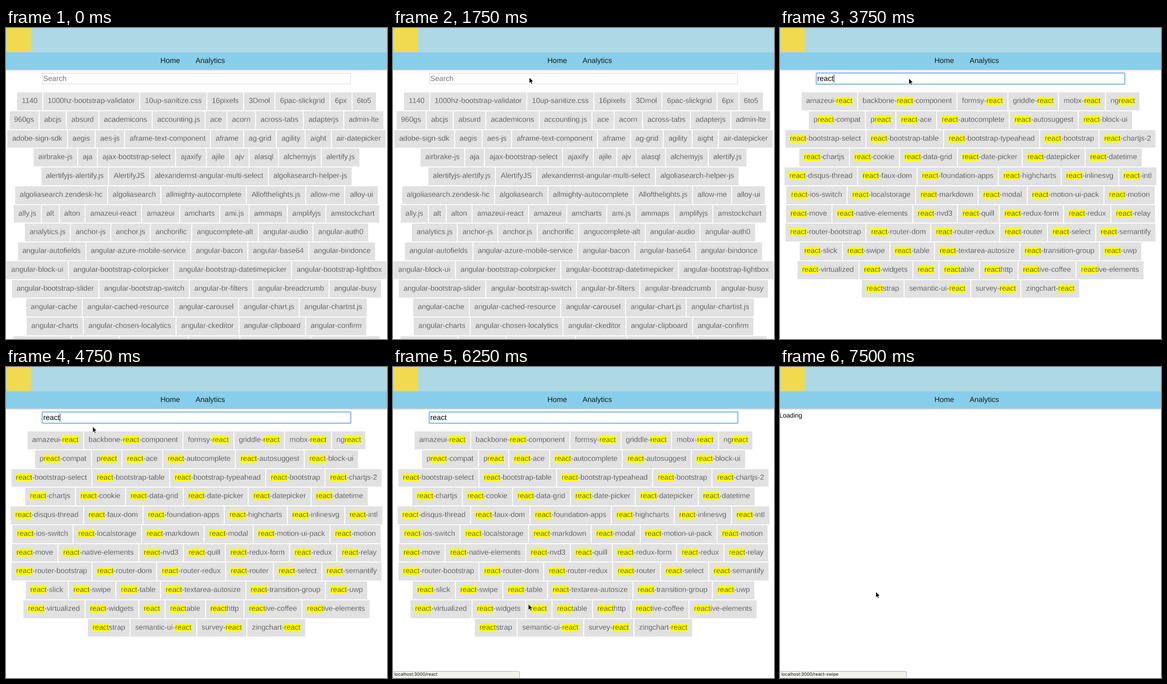
These frames come from a looping animation (829 by 676 pixels, 8000 ms). An HTML page:

```html
<!DOCTYPE html>
<html lang="en">
<head>
<meta charset="utf-8">
<title>Library search</title>
<style>
  html, body { margin: 0; width: 100%; height: 100%; overflow: hidden; background: #fff; }
  body {
    position: relative; font: 16px "Liberation Sans", Arial, sans-serif;
    text-rendering: geometricPrecision; cursor: default;
  }
  #stage { position: absolute; left: 0; top: 0; width: 829px; height: 676px; overflow: hidden; }
  #stage > * { position: absolute; box-sizing: border-box; white-space: nowrap; }
  #banner { left: 0; top: 0; width: 829px; height: 55px; background: #add8e6; }
  #logo { left: 2px; top: 0; width: 53px; height: 52px; background: #f0db4f; }
  #nav {
    left: 0; top: 54px; width: 829px; height: 36px; background: #87ceeb; color: #1a1a1a;
    box-shadow: 0 1px 3px rgba(0, 0, 0, .35); line-height: 36px;
  }
  #nav span { position: absolute; }
  #search {
    left: 79px; top: 98px; width: 671px; height: 24px; padding-left: 1px;
    border: 1px solid #d3d3d3; line-height: 23px; color: #757575; background: #fff;
  }
  #search.typed { color: #000; }
  #search.focused::after {
    content: ""; position: absolute; inset: -2px; border: 2px solid #7fb6f6;
    border-radius: 2px; box-shadow: 0 0 1px 1px rgba(127, 182, 246, .4);
  }
  #caret { top: 101px; width: 1px; height: 18px; background: #000; }
  .row {
    position: absolute; left: 0; width: 829px; height: 38.75px; line-height: 38.75px;
    display: flex; justify-content: center; gap: 2px;
    font-size: 15.96px; color: #484848;
  }
  .tag { flex: none; padding: 0 10px; background: #e1e1e1; -webkit-text-stroke: .28px #e1e1e1; }
  .blank { padding: 0; }
  mark { color: inherit; background: #ff0; -webkit-text-stroke-color: #ff0; }
  #loading { left: -1.5px; top: 97px; font-size: 14px; line-height: 17px; color: #000; }
  #status {
    left: -1px; top: 661px; width: 277px; height: 17px; padding-left: 3px;
    background: #f1f1ee; border: 1px solid #a9a9a9; border-radius: 0 3px 0 0;
    font: 9.5px/14px Inter, sans-serif; color: #111;
  }
  #cursor { left: 0; top: 0; overflow: visible; }
</style>
</head>
<body>
<div id="stage">
  <div id="all"></div>
  <div id="matches"></div>
  <div id="loading">Loading</div>
  <div id="banner"></div>
  <div id="logo"></div>
  <div id="nav"><span style="left:336px">Home</span><span style="left:412.5px">Analytics</span></div>
  <div id="search"></div>
  <div id="caret"></div>
  <div id="status"></div>
  <svg id="cursor" width="12" height="18">
    <path d="M.5 .5V13.2L3.4 10.5L5.4 15L7.5 14.1L5.6 9.7H9.6Z" fill="#000" stroke="#fff" stroke-width=".9"/>
  </svg>
</div>
<script>
const LOOP = 8000, PITCH = 40.75, TOP = 140, QUERY = "react";
const $ = id => document.getElementById(id);

const allRows = `1140 1000hz-bootstrap-validator 10up-sanitize.css 16pixels 3Dmol 6pac-slickgrid 6px 6to5
960gs abcjs absurd academicons accounting.js ace acorn across-tabs adapterjs admin-lte
adobe-sign-sdk aegis aes-js aframe-text-component aframe ag-grid agility aight air-datepicker
airbrake-js aja ajax-bootstrap-select ajaxify ajile ajv alasql alchemyjs alertify.js
alertifyjs-alertify.js AlertifyJS alexandernst-angular-multi-select algoliasearch-helper-js
algoliasearch.zendesk-hc algoliasearch allmighty-autocomplete Allofthelights.js allow-me alloy-ui
ally.js alt alton amazeui-react amazeui amcharts ami.js ammaps amplifyjs amstockchart
analytics.js anchor-js anchor.js anchorific angucomplete-alt angular-audio angular-auth0
angular-autofields angular-azure-mobile-service angular-bacon angular-base64 angular-bindonce
angular-block-ui angular-bootstrap-colorpicker angular-bootstrap-datetimepicker angular-bootstrap-lightbox
angular-bootstrap-slider angular-bootstrap-switch angular-br-filters angular-breadcrumb angular-busy
angular-cache angular-cached-resource angular-carousel angular-chart.js angular-chartist.js
angular-charts angular-chosen-localytics angular-ckeditor angular-clipboard angular-confirm`;

const matchRows = `amazeui-react backbone-react-component formsy-react griddle-react mobx-react ngreact
preact-compat preact react-ace react-autocomplete react-autosuggest react-block-ui
react-bootstrap-select react-bootstrap-table react-bootstrap-typeahead react-bootstrap react-chartjs-2
react-chartjs react-cookie react-data-grid react-date-picker react-datepicker react-datetime
react-disqus-thread react-faux-dom react-foundation-apps react-highcharts react-inlinesvg react-intl
react-ios-switch react-localstorage react-markdown react-modal react-motion-ui-pack react-motion
react-move react-native-elements react-nvd3 react-quill react-redux-form react-redux react-relay
react-router-bootstrap react-router-dom react-router-redux react-router react-select react-semantify
react-slick react-swipe react-table react-textarea-autosize react-transition-group react-uwp
react-virtualized react-widgets react reactable reacthttp reactive-coffee reactive-elements
reactstrap semantic-ui-react survey-react zingchart-react`;

const rowHtml = (i, tags) => `<div class="row" style="top:${TOP + i * PITCH}px">${tags}</div>`;
const tagRows = (text, label) => text.split("\n").map((line, i) =>
  rowHtml(i, line.split(" ").map(name => `<span class="tag">${label(name)}</span>`).join(""))).join("");

// The row cut off by the bottom edge shows only the tops of its tags.
const cutRow = rowHtml(13, [125, 102, 149, 110, 152, 149]
  .map(w => `<span class="tag blank" style="width:${w}px"></span>`).join(""));

$("all").innerHTML = tagRows(allRows, name => name) + cutRow;
$("matches").innerHTML = tagRows(matchRows, name => name.replace(QUERY, `<mark>${QUERY}</mark>`));

// Each track holds [start time, value...]; a value stays until the next start.
const pointer = [
  [250, 415, 0], [500, 364, 34], [750, 297, 106], [1000, 297, 107], [1750, 296, 107],
  [2000, 280, 109], [4500, 204, 132], [4750, 188, 129], [5000, 556, 414], [5250, 550, 504],
  [5500, 459, 515], [5750, 425, 451], [6000, 350, 440], [6250, 294, 515], [6750, 247, 556],
  [7000, 228, 447], [7250, 208, 488]
];
const hovered = [
  [5250, "react-transition-group"], [5500, "reacthttp"], [5750, "react-router-redux"],
  [6250, "react"], [6750, "reactstrap"], [7000, "react-router-dom"], [7250, "react-swipe"]
];
const FOCUS = 2250, TYPED = 3750, LOADING = 7500;

const at = (track, t) => track.filter(step => step[0] <= t).pop();
const show = (id, on) => { $(id).style.display = on ? "" : "none"; };

function caretOn(t) {
  if (t < FOCUS || t >= LOADING) return false;
  return t < TYPED ? t < FOCUS + 500 : (t - TYPED) % 1000 < 500;
}

function render(t) {
  const typed = t >= TYPED, loading = t >= LOADING;
  show("all", !typed);
  show("matches", typed && !loading);
  show("loading", loading);
  show("search", !loading);
  $("search").textContent = typed ? QUERY : "Search";
  $("search").className = (t >= FOCUS ? "focused " : "") + (typed ? "typed" : "");
  show("caret", caretOn(t));
  $("caret").style.left = (typed ? 117 : 82) + "px";

  const link = at(hovered, t);
  show("status", link);
  if (link) $("status").textContent = "localhost:3000/" + link[1];

  const pos = at(pointer, t);
  show("cursor", pos);
  if (pos) $("cursor").style.transform = `translate(${pos[1]}px, ${pos[2]}px)`;
}

const start = performance.now();
function tick() {
  render((performance.now() - start) % LOOP);
  requestAnimationFrame(tick);
}
tick();
</script>
</body>
</html>
```
